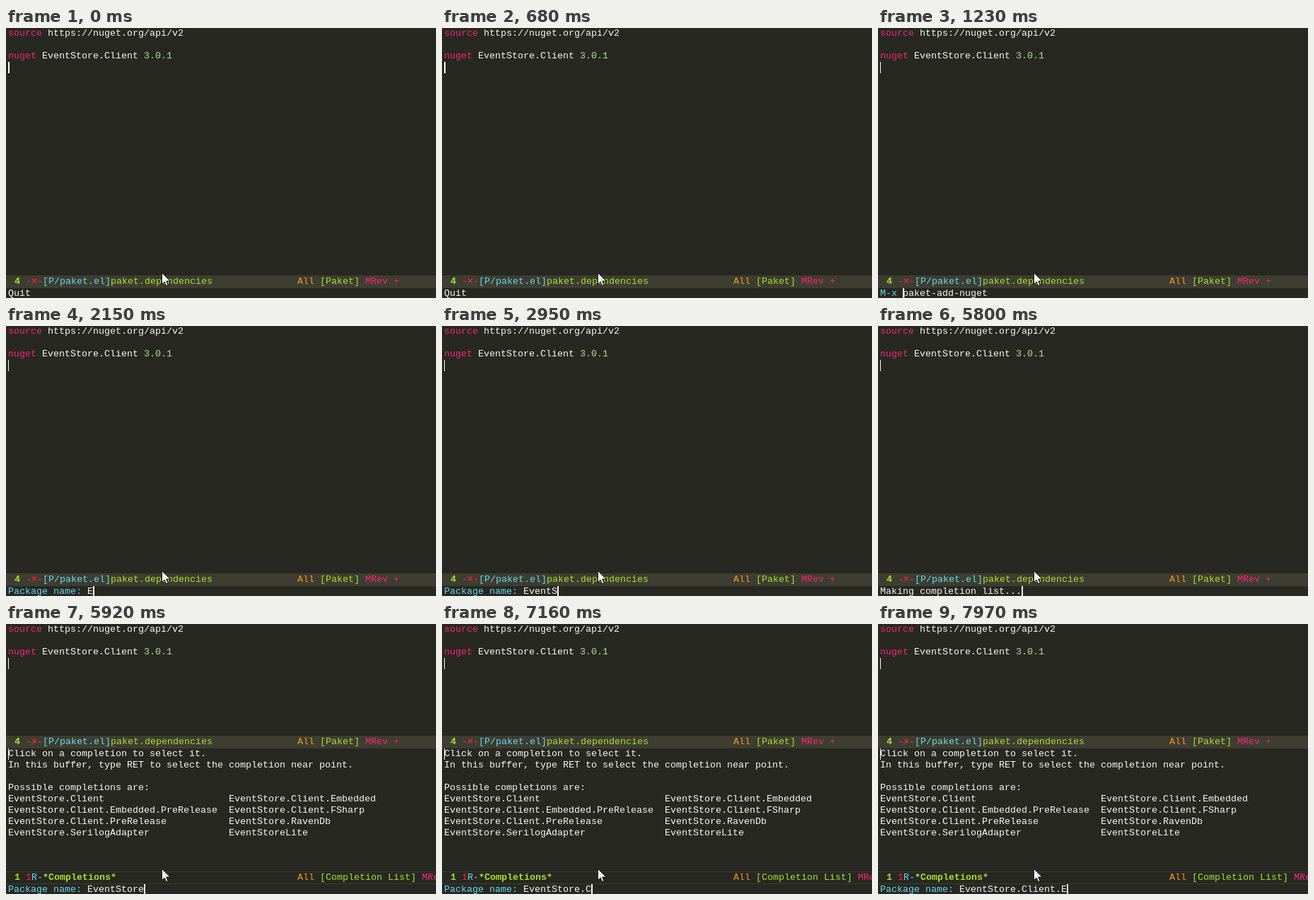
An HTML page that plays this animation: 608 by 382 pixels, repeating every 8 s.

```html
<!DOCTYPE html>
<html lang="en">
<head>
<meta charset="utf-8">
<title>Adding a package</title>
<style>
  html, body { margin: 0; width: 100%; height: 100%; overflow: hidden; background: #272822; }
  #stage {
    position: relative; width: 608px; height: 382px; overflow: hidden;
    background: #272822; color: #f8f8f2;
    font: 13.333px/16px "Liberation Mono", "Courier New", monospace;
    font-variant-ligatures: none;
  }
  #stage pre { position: absolute; left: 3px; margin: 0; font: inherit; white-space: pre; }
  .caret { position: absolute; width: 2px; height: 16px; background: #f8f8f0; }
  .caret.thin { width: 1px; }
  .bar {
    position: absolute; left: 0; width: 608px; height: 18px;
    background: #3e3d31; box-sizing: border-box;
  }
  .bar.idle { background: #272822; border: solid #3e3d31; border-width: 1px 0; }
  .bar pre { left: 4px !important; top: 1px; }
  .bar.idle pre { top: 0; }
  .pink { color: #f92672; }
  .cyan { color: #66d9ef; }
  .lime { color: #a6e22e; }
  .pale { color: #afe08a; }
  .orange { color: #fd971f; }
  .red { color: #f5222d; }
  b { font-weight: bold; }
  #list { position: absolute; left: 0; top: 176px; width: 608px; height: 192px; }
  #pointer { position: absolute; left: 220px; top: 345px; }
</style>
</head>
<body>
<div id="stage">
  <pre style="top:0"><span class="pink">source</span> https://nuget.org/api/v2

<span class="pink">nuget</span> EventStore.Client <span class="pale">3.0.1</span></pre>
  <div class="caret" id="main" style="left:3px;top:48px"></div>

  <div class="bar" id="bar"><pre> <b class="lime">4</b> <span class="pink">-</span><b class="red">×</b><span class="pink">-</span><span class="cyan">[P/paket.el]</span><span class="lime">paket.dependencies</span>               <span class="orange">All</span> <span class="lime">[Paket]</span> <span class="pink">MRev +</span></pre></div>

  <div id="list">
    <pre id="rows" style="top:0"></pre>
    <div class="caret thin" style="left:3px;top:0"></div>
    <div class="bar idle" style="top:174px"><pre> <b class="lime">1</b> <span class="red">1</span><span class="cyan">R-</span><b class="lime">*Completions*</b>                                <span class="orange">All</span> <span class="lime">[Completion List]</span> <span class="pink">MRev +</span></pre></div>
  </div>

  <pre style="top:368px"><span class="cyan" id="prompt"></span><span id="entry"></span></pre>
  <div class="caret" id="mini" style="top:368px"></div>

  <svg id="pointer" width="14" height="22" viewBox="0 0 14 22">
    <path d="M.5 1.5V17.5L4.2 14 6.6 19.6 9 18.6 6.6 13H11.8Z" fill="#fff" stroke="#000" stroke-width=".8"/>
  </svg>
</div>
<script>
  const $ = id => document.getElementById(id);
  const LOOP = 8000, CELL = 8, LEFT = 3, LIST_AT = 5920;
  const MX = "M-x ", ASK = "Package name: ", WORD = "EventStore.Client.E";

  const pairs = [
    ["Client", ".Client.Embedded"],
    ["Client.Embedded.PreRelease", ".Client.FSharp"],
    ["Client.PreRelease", ".RavenDb"],
    ["SerilogAdapter", "Lite"]
  ];
  $("rows").textContent = [
    "Click on a completion to select it.",
    "In this buffer, type RET to select the completion near point.",
    "",
    "Possible completions are:",
    ...pairs.map(([a, b]) => ("EventStore." + a).padEnd(39) + "EventStore" + b)
  ].join("\n");

  // Each step: start time, prompt, entry, caret column (-1 hides it)
  const typed = (time, count, caret = true) =>
    [time, ASK, WORD.slice(0, count), caret ? ASK.length + count : -1];
  const steps = [
    [0, "", "Quit", -1],
    [950, MX, "", 4],
    [1230, MX, "paket-add-nuget", 4],
    typed(1630, 0, false), typed(1750, 0),
    typed(2150, 1), typed(2430, 3), typed(2550, 4), typed(2700, 5),
    typed(2950, 6), typed(3100, 7), typed(3350, 8), typed(3500, 10),
    typed(4030, 10, false),
    [5800, "", "Making completion list...", 25],
    typed(LIST_AT, 10), typed(6480, 10, false), typed(6890, 10),
    typed(7010, 11), typed(7160, 12), typed(7280, 13), typed(7430, 14),
    typed(7580, 15), typed(7700, 16), typed(7820, 18), typed(7970, 19)
  ];

  const show = (el, on) => { el.style.visibility = on ? "visible" : "hidden"; };
  let last = "";

  function draw(t) {
    const [, prompt, entry, col] = steps.findLast(s => s[0] <= t);
    const blinkOff = t >= 120 && t < 680;
    const listed = t >= LIST_AT;
    const key = [prompt, entry, col, blinkOff, listed].join("|");
    if (key === last) return;
    last = key;

    $("prompt").textContent = prompt;
    $("entry").textContent = entry;
    $("mini").style.left = LEFT + col * CELL + "px";
    show($("mini"), col >= 0);
    $("main").classList.toggle("thin", t >= 950);
    show($("main"), !blinkOff);
    $("bar").style.top = (listed ? 158 : 350) + "px";
    show($("list"), listed);
  }

  function tick() {
    draw(performance.now() % LOOP);
    requestAnimationFrame(tick);
  }
  tick();
</script>
</body>
</html>
```
